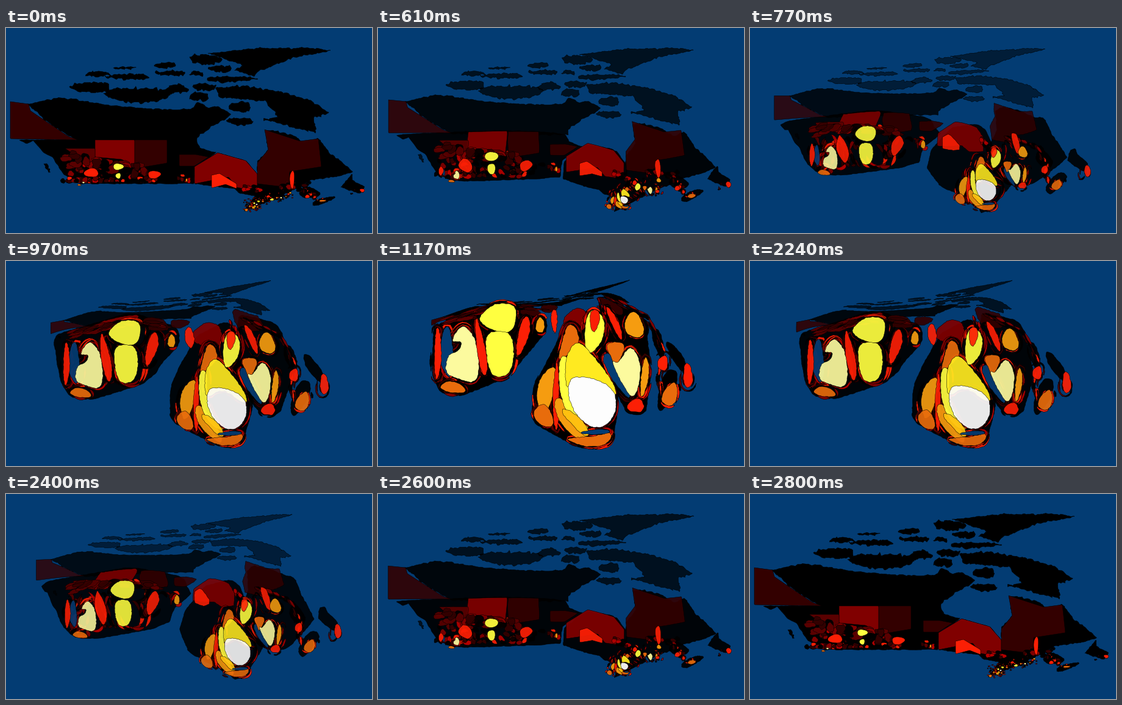
These frames come from a looping animation (600 by 337 pixels, 3.25 s). A matplotlib script:

```python
import numpy as np
import matplotlib.pyplot as plt
from matplotlib.animation import FuncAnimation
from matplotlib.collections import PolyCollection
from matplotlib.colors import to_rgba

W, H, DPI = 600, 337, 100
SEA = "#033c73"
HOT = dict(K="#000000", D="#330000", M="#5a0000", R="#800000", C="#b30000",
           S="#fb1f05", O="#e86c0c", G="#f59c10", A="#ffc010", E="#ffea20",
           Y="#ffff40", P="#fcfa9e", W="#fdfdfd", B=SEA)
BASE, LAND, SHARD, TOWN = range(4)
rng = np.random.default_rng(11)
shapes = []  # (layer, map outline, cartogram outline, colour, fade)


def resample(p, u, closed=False):
    """Points at the fractions u of the length of a path."""
    if closed:
        p = np.vstack([p, p[:1]])
    d = np.r_[0, np.cumsum(np.hypot(*np.diff(p, axis=0).T))]
    return np.stack([np.interp(u * d[-1], d, c) for c in p.T], 1)


def perimeter(p):
    return np.hypot(*(p - np.roll(p, 1, axis=0)).T).sum()


def clockwise(p):
    x, y = p.T
    return p if (x * np.roll(y, -1) - y * np.roll(x, -1)).sum() > 0 else p[::-1]


def rough(p, amp):
    n = rng.normal(size=p.shape)
    return p + amp * (n + np.roll(n, 1, axis=0)) / 2


def align(p, ref):
    """Roll p so that its points face those of ref."""
    a, b = [(q - q.mean(0)) / (q.std(0) + 1e-6) for q in (p, ref)]
    cost = [((np.roll(a, -s, axis=0) - b) ** 2).sum() for s in range(len(p))]
    return np.roll(p, -int(np.argmin(cost)), axis=0)


def chaikin(p):
    for _ in range(2):
        q = np.roll(p, -1, axis=0)
        p = np.stack([.75 * p + .25 * q, .25 * p + .75 * q], 1).reshape(-1, 2)
    return p


def blob(x, y, rx, ry, tilt=0, n=36):
    a = np.linspace(0, 2 * np.pi, n, endpoint=False)
    r = 1 + .07 * np.sin(2 * a + x) + .08 * np.sin(3 * a + y)
    u, v = rx * r * np.cos(a), ry * r * np.sin(a)
    c, s = np.cos(np.radians(tilt)), np.sin(np.radians(tilt))
    return np.stack([x + u * c - v * s, y + u * s + v * c], 1)


def outline(v, soft=False):
    """Up to five numbers are a tilted blob, more are corners."""
    if len(v) <= 5:
        return blob(*v)
    p = np.array(v, float).reshape(-1, 2)
    return chaikin(p) if soft else p


# Pull of the far north: map position to cartogram position.
PULL = np.array([
    (7, 121, 88, 97), (7, 182, 88, 106), (67, 230, 90, 102), (110, 104, 165, 71),
    (180, 75, 215, 70), (220, 131, 232, 73), (118, 186, 140, 91), (290, 130, 288, 68),
    (264, 190, 262, 74), (313, 186, 302, 73), (320, 50, 318, 57), (420, 60, 364, 48),
    (533, 37, 413, 31), (530, 140, 412, 69), (440, 140, 372, 57), (370, 143, 338, 60)], float)


def spread(p, q):
    return np.hypot(*(p[:, None] - q[None]).transpose(2, 0, 1))


def solve_pull():
    src, dst = np.hsplit(PULL, 2)
    q = np.c_[np.ones(len(src)), src]
    m = np.block([[spread(src, src), q], [q.T, np.zeros((3, 3))]])
    return np.linalg.solve(m, np.r_[dst, np.zeros((3, 2))])


COEF = solve_pull()


def warp(p):
    return np.c_[spread(p, PULL[:, :2]), np.ones(len(p)), p] @ COEF


def region(layer, colour, here, there=None, jag=0., fade=.12):
    a = outline(here)
    b = a if there is None else there if isinstance(there, np.ndarray) else outline(there, True)
    n = int(np.clip(max(perimeter(a), perimeter(b)) / 2.2, 24, 260))
    u = np.arange(n) / n
    a = rough(resample(clockwise(a), u, True), jag)
    if there is None:
        b = warp(a)
    else:
        b = resample(clockwise(b), u, True)
        a, b = align(a, b), rough(b, .5)
    shapes.append((layer, a, b, HOT[colour], fade))


towns = []  # (map centre, cartogram outline, colour)


def town(colour, x, y, r, *there, h=None):
    region(TOWN, colour, (x, y, r, h or .7 * r), there)
    towns.append(((x, y), clockwise(outline(there, True)), colour))


def hull(group):
    a = np.linspace(0, 2 * np.pi, 48, endpoint=False)
    way = np.stack([np.cos(a), np.sin(a)])
    p = np.vstack([t[1] for t in group])
    return p[np.argmax(p @ way, axis=0)] + 4 * way.T


# Towns of the west
town("B", 107, 250, 1, 113, 150, 11, 40)
town("S", 104, 247, 4, 98, 152, 6, 40)
town("P", 127, 254, 2, 132, 110, 144, 106, 160, 128, 167, 172, 160, 203, 126, 192,
     110, 185, 113, 154, 134, 148, 138, 130, 118, 134)
town("O", 120, 258, 3, 123, 208, 21, 9, 14, h=1.3)
town("S", 140, 238, 11, 169, 145, 7, 45, -8)
town("Y", 184, 228, 8, 161, 97, 182, 75, 204, 68, 227, 74, 226, 98, 219, 118, 190, 116)
town("Y", 184, 243, 4, 176, 119, 198, 114, 221, 121, 223, 166, 212, 190, 188, 191, 178, 165, h=5)
town("S", 243, 241, 11, 238, 122, 9, 31, 15, h=6)
town("G", 296, 250, 1.3, 266, 106, 7, 13, h=3)
west = hull(towns)

# Towns of the middle
mid = len(towns)
town("O", 421, 285, 2, 304, 122, 312, 103, 326, 109, 331, 134, 310, 156, 293, 165)
town("Y", 436, 282, 3, 354, 115, 15, 37, 5)
town("S", 430, 277, 3, 355, 97, 8, 18)
town("G", 400, 293, 2, 276, 212, 14, 38, 15)
town("O", 394, 299, 3, 272, 255, 13, 21, -35)
town("S", 403, 293, 2, 292, 225, 5, 55)
town("G", 406, 295, 3, 314, 262, 13, 42, -32)
town("Y", 407, 288, 2, 296, 156, 314, 156, 311, 215, 332, 262, 350, 278, 318, 268, 297, 220)
town("E", 414, 285, 2.4, 306, 158, 326, 128, 350, 152, 390, 204, 389, 228, 340, 190, 308, 218)
town("A", 408, 293, 2, 325, 265, 9, 28, -45)
town("W", 411, 290, 1.7, 311, 199, 326, 188, 367, 197, 390, 215, 390, 254, 366, 277, 336, 267, 314, 235)
town("O", 413, 294, 2.4, 322, 290, 356, 288, 385, 280, 378, 301, 345, 307, 305, 293)
town("B", 414, 294, 1, 358, 281, 24, 4, -4)
middle = hull(towns[mid:])

# Towns of the east
mid = len(towns)
town("S", 469, 249, 4, 388, 102, 6, 27, -25, h=14)
town("G", 466, 271, 2, 420, 106, 16, 20, -10)
town("B", 448, 283, 1, 390, 186, 9, 42, -27)
town("O", 444, 279, 2, 372, 138, 388, 132, 407, 137, 399, 158, 388, 179, 382, 156)
town("P", 451, 279, 1.8, 381, 162, 394, 170, 412, 137, 430, 160, 430, 200, 418, 229, 400, 202)
town("G", 459, 277, 1.4, 437, 190, 6, 31, 5)
town("S", 463, 273, 2, 423, 238, 13, 12)
east = hull(towns[mid:])
town("S", 494, 277, 4, 467, 168, 8, 13)
town("O", 519, 284, 6, 479, 220, 11, 21, 18, h=1.5)
town("S", 584, 267, 4, 508, 189, 8, 19)

# Arctic islands
for isle in [(326, 52, 26, 8), (351, 67, 20, 5), (262, 61, 20, 4), (150, 76, 22, 4), (195, 66, 18, 2),
             (200, 80, 38, 4), (271, 74, 24, 4), (312, 75, 11, 4), (368, 84, 42, 4), (139, 98, 30, 9),
             (215, 110, 50, 13), (280, 101, 19, 7), (325, 97, 20, 5), (316, 113, 14, 8),
             (384, 130, 17, 9), (384, 154, 21, 6), (67, 229, 3, 8, -30)]:
    region(BASE, "K", isle, jag=1.5, fade=.5)
region(BASE, "K", [332, 41, 420, 33, 500, 33, 533, 37, 470, 49, 412, 72, 408, 79, 375, 69, 388, 62, 348, 46],
       jag=1, fade=.5)
region(BASE, "K", [345, 98, 392, 95, 440, 103, 492, 116, 530, 140, 504, 147, 508, 172, 440, 155, 421, 151,
                   447, 146, 425, 120, 350, 113], jag=1.5, fade=.5)

# Mainland
region(BASE, "K", [35, 125, 90, 114, 122, 119, 160, 126, 222, 132, 256, 134, 303, 134, 314, 121, 332, 132,
                   347, 128, 370, 143, 340, 160, 313, 180, 313, 190, 264, 190, 118, 186, 75, 160],
       jag=1, fade=.2)
region(BASE, "K", [22, 184, 264, 183, 312, 186, 318, 197, 345, 205, 309, 228, 309, 256, 122, 256, 95, 241,
                   75, 211, 62, 205, 45, 185, 34, 190], west, jag=.5)
region(BASE, "K", [309, 228, 347, 205, 394, 219, 412, 240, 412, 258, 456, 277, 416, 290, 390, 301, 399, 290,
                   408, 276, 384, 272, 374, 264, 309, 256], middle, jag=.4)
region(BASE, "K", [425, 168, 440, 169, 472, 177, 494, 192, 512, 181, 530, 205, 569, 236, 555, 242, 500, 250,
                   440, 283, 412, 268, 412, 220, 430, 200], east, jag=.8)
region(BASE, "K", (497, 271, 16, 9), (460, 135, 7, 28, -15), jag=.6)
region(BASE, "K", (520, 284, 20, 4, -18), (474, 210, 12, 36, 15), jag=.5)
region(BASE, "K", [549, 262, 567, 240, 568, 250, 588, 262, 580, 272], (490, 158, 8, 28, -30), jag=.6)

# Large divisions
region(LAND, "D", [7, 121, 37, 125, 40, 136, 56, 147, 102, 178, 118, 184, 7, 182], fade=.2)
region(LAND, "R", [146, 184, 211, 184, 211, 230, 190, 216, 146, 212], (180, 80, 45, 5, -14))
region(LAND, "D", [211, 184, 264, 184, 264, 222, 211, 231], (246, 82, 20, 8, 10))
region(LAND, "M", [97, 198, 146, 198, 146, 225, 110, 207], (138, 95, 26, 4, -8))
region(LAND, "D", [284, 208, 311, 208, 332, 212, 309, 227, 284, 227], (280, 78, 14, 6))
region(LAND, "R", [309, 228, 347, 205, 393, 218, 412, 240, 412, 268, 378, 262, 365, 245, 309, 256],
       (324, 98, 20, 18, -20))
region(LAND, "S", [337, 242, 350, 239, 378, 256, 378, 264, 360, 257, 337, 263], (289, 98, 5, 19))
region(LAND, "D", [424, 167, 482, 186, 512, 182, 517, 228, 465, 236, 464, 262, 412, 256, 412, 222, 430, 200],
       (382, 74, 26, 7, 30), fade=.2)

HOMES = np.array([t[0] for t in towns], float)
CORES = np.array([t[1].mean(0) for t in towns])
S = np.linspace(0, 1, 11)


def home(p):
    w = 1 / (spread(p[None], CORES)[0] + 1) ** 3
    x, y = w @ HOMES / w.sum()
    wide = 9 if x < 310 else 2.5
    x, y = np.array([x, y]) + rng.normal(0, wide, 2)
    return x, min(y, 251) if x < 310 else y, wide / 2


def sliver(colours, line, off, half, here=None):
    """A thin strip beside a line, which is a small patch on the map."""
    t = np.gradient(line, axis=0) + 1e-9
    nrm = np.stack([-t[:, 1], t[:, 0]], 1) / np.hypot(*t.T)[:, None]
    half = half * np.sin(np.pi * S) ** .7 + rng.normal(0, .25, len(S))
    b = np.vstack([line + nrm * (off + half)[:, None], (line + nrm * (off - half)[:, None])[::-1]])
    x, y, r = here or home(b.mean(0))
    a = rough(blob(x, y, r * rng.uniform(.6, 1.3), r * rng.uniform(.5, 1), n=len(b)), r * .1)
    b = clockwise(b)
    shapes.append((SHARD, align(a, b), b, HOT[rng.choice(list(colours))], .12))


# Small divisions squeezed around every town
for _, ring, colour in towns:
    for _ in range(int(perimeter(ring) / 14)):
        u = (rng.random() + S * rng.uniform(.1, .3)) % 1
        sliver("KKDRCSS" if colour != "S" else "KKDMR", resample(ring, u, True),
               -rng.uniform(0, 7), rng.uniform(.7, 2.3))


def strand(colours, there, here, n, width, r):
    path, base = outline(there), outline(here)
    for _ in range(n):
        u = rng.uniform(0, .8) + S * rng.uniform(.1, .2)
        x, y = resample(base, u[5:6])[0] + rng.normal(0, r / 2, 2)
        sliver(colours, resample(path, u), rng.uniform(-width, width), rng.uniform(.8, 2.2), (x, y, r))


strand("DMRDK", [98, 104, 140, 90, 190, 74, 298, 80], [85, 212, 160, 226, 255, 236], 36, 5, 8)
strand("KKDR", [362, 52, 405, 74, 440, 92, 462, 132], [440, 262, 480, 262, 505, 256], 26, 4, 4)
strand("KDRC", [364, 56, 371, 90, 372, 140], [385, 262, 405, 266, 425, 270], 16, 5, 4)
strand("KKDS", [452, 112, 468, 150, 462, 190, 466, 244], [485, 266, 500, 272, 512, 284], 22, 5, 3)

shapes.sort(key=lambda s: s[0])

STEP, FORTH, BACK = 40, 450, 2080


def ease(q):
    return 2 * q * q if q < .5 else 1 - 2 * (1 - q) ** 2


def progress(ms):
    if ms < FORTH:
        return 0.
    if ms < BACK:
        k = (ms - FORTH) // STEP + 1
        return ease(k / 20) if k < 19 else 1.
    return 1 - ease(min(((ms - BACK) // STEP + 1) / 18.5, 1))


fig = plt.figure(figsize=(W / DPI, H / DPI), dpi=DPI, facecolor=SEA)
ax = fig.add_axes([0, 0, 1, 1])
ax.set_xlim(0, W)
ax.set_ylim(H, 0)
ax.axis("off")

fill = np.array([to_rgba(s[3]) for s in shapes])
fade = np.array([s[4] for s in shapes])
cells = PolyCollection([s[1] for s in shapes], facecolors=fill, edgecolors="black", linewidths=.35)
ax.add_collection(cells, autolim=False)


def draw(frame):
    p = progress(frame * 10)
    cells.set_verts([a + (b - a) * p for _, a, b, *_ in shapes])
    now = fill.copy()
    now[:, 3] = 1 - fade * np.sin(np.pi * p) ** .6 if 0 < p < 1 else 1
    cells.set_facecolor(now)
    return cells,


anim = FuncAnimation(fig, draw, frames=325, interval=10, repeat=True, repeat_delay=0, blit=False)
plt.show()
```
